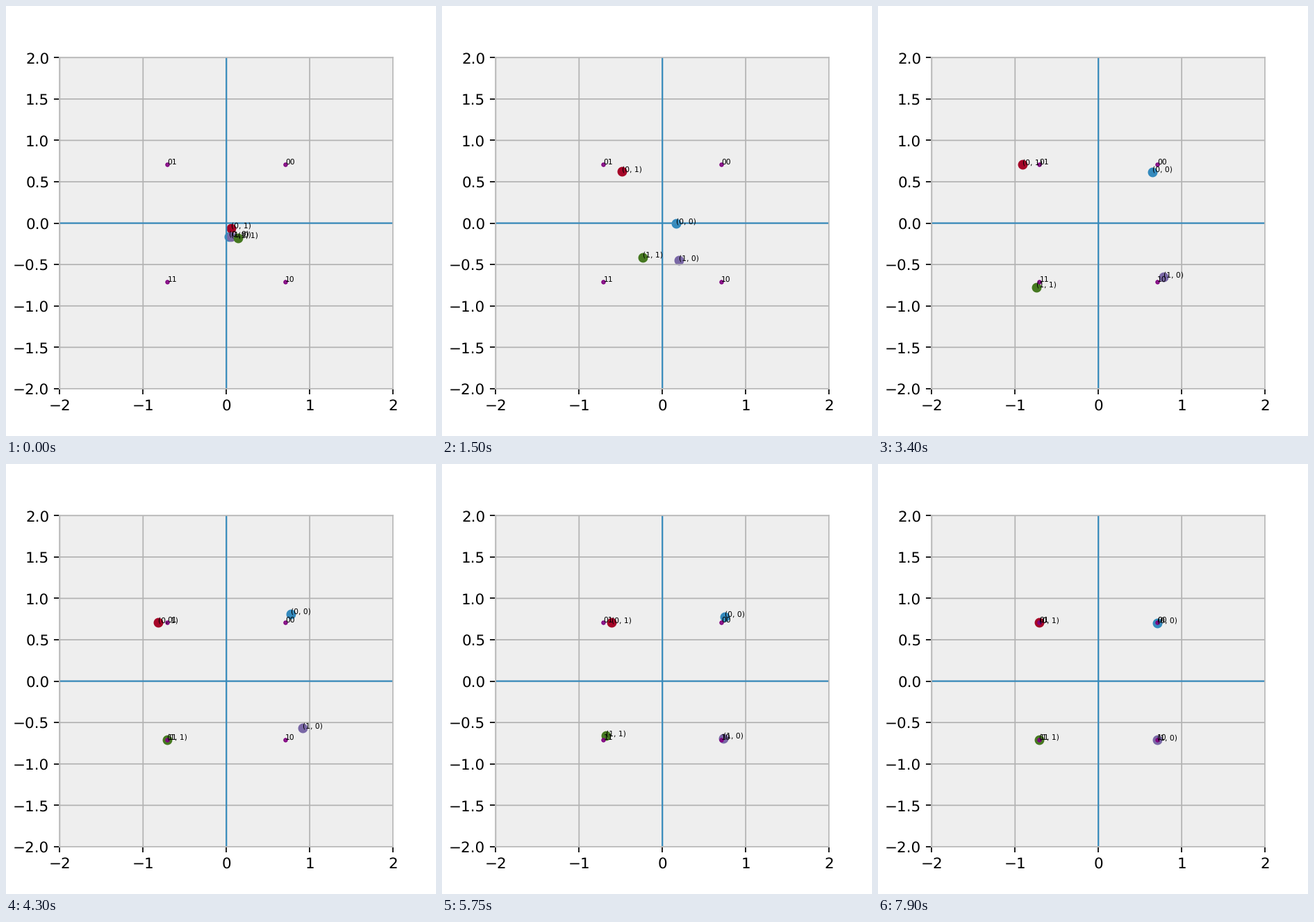
Recreate the animation shown at these times as a matplotlib script. Size 619x619 px, loop 7.95 s.

```python
import numpy as np
import matplotlib.pyplot as plt
from matplotlib.animation import FuncAnimation

FRAMES, STEP = 159, 50
LOOP = FRAMES * STEP / 1000
PERIOD = 5.6
COLORS = ["#348ABD", "#A60628", "#7A68A6", "#467821"]
BITS = np.array([(0, 0), (0, 1), (1, 0), (1, 1)])

# First bit picks the row, second bit the column.
CORNERS = np.sqrt(0.5) * (1 - 2 * BITS[:, ::-1])
STARTS = np.array([(.035, -.16), (.06, -.06), (.055, -.165), (.14, -.18)])

# Per symbol: settling time, sway in x and y, moment the sway crosses zero.
SETTLE = np.array([2.4, 1.15, 1.9, 1.8])
SWAY = np.array([(.13, .22), (.25, 0), (.3, .2), (.06, .1)])
LAG = np.array([3.6, 4.9, 3.1, 4.3])


def positions(t):
    """Symbols leave the start, overshoot their corners and calm down."""
    left = np.exp(-(t / SETTLE) ** 3)
    calm = 1 - (t / LOOP) ** 2
    swing = (1 - left) * calm * np.sin(2 * np.pi * (t - LAG) / PERIOD)
    return (CORNERS + (STARTS - CORNERS) * left[:, None]
            + SWAY * swing[:, None])


plt.rcParams["font.family"] = "DejaVu Sans"
plt.rcParams["text.hinting"] = "no_hinting"
fig, ax = plt.subplots(figsize=(4, 4), dpi=154.75, facecolor="white")
ax.set_facecolor("#eeeeee")
ax.set_xlim(-2, 2)
ax.set_ylim(-2, 2)
ax.set_xticks(np.arange(-2, 3))
ax.set_yticks(np.arange(-2, 2.1, 0.5))
ax.grid(True, color="#b2b2b2", linewidth=0.8)
for spine in ax.spines.values():
    spine.set_color("#bcbcbc")
axes_lines = [draw(0, color=COLORS[0], linewidth=1)
              for draw in (ax.axhline, ax.axvline)]
for line in [*ax.get_xgridlines(), *ax.get_ygridlines(), *axes_lines]:
    line.set_snap(False)


def mark(point, text, size, color):
    dot = ax.scatter(*point, s=size, color=color, linewidths=2)
    return dot, ax.text(*point, text, fontsize=5, zorder=3)


symbols = [mark(p, f"({a}, {b})", 20, color)
           for p, (a, b), color in zip(positions(0), BITS, COLORS)]
for p, (a, b) in zip(CORNERS, BITS):
    mark(p, f"{a}{b}", 1, "purple")


def update(i):
    for (dot, tag), p in zip(symbols, positions(i * STEP / 1000)):
        dot.set_offsets([p])
        tag.set_position(p)


anim = FuncAnimation(fig, update, frames=FRAMES, interval=STEP,
                     repeat=True, repeat_delay=0, blit=False)
plt.show()
```
